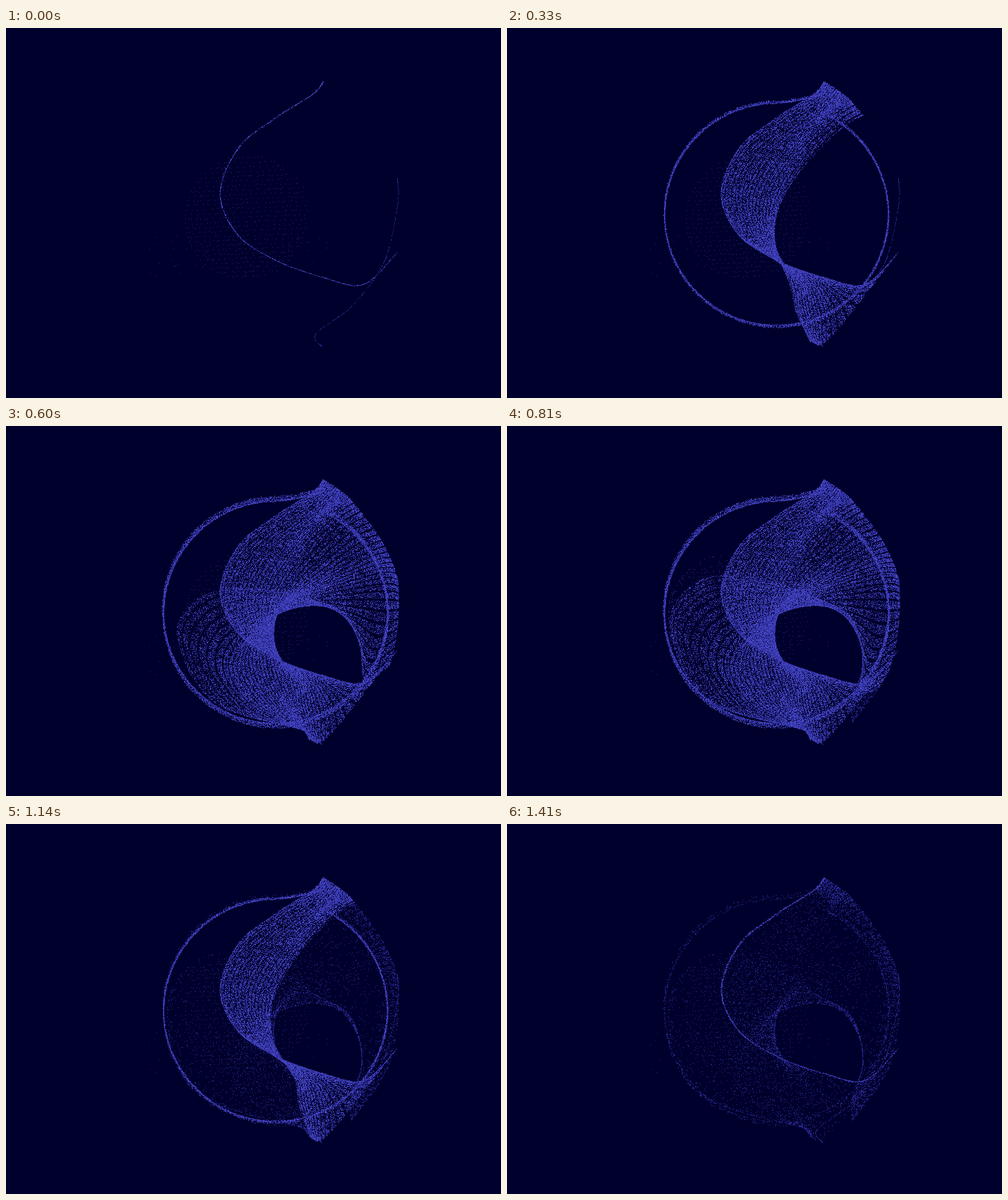
Animation, 719 px wide and 537 px high, one loop 1440 ms. Source, as an HTML page with a canvas:

```html
<!DOCTYPE html>
<html lang="en">
<head>
<meta charset="utf-8">
<title>Thread surface</title>
<style>
  html, body { margin: 0; width: 100%; height: 100%; overflow: hidden; background: #00002c; }
  canvas { display: block; }
</style>
</head>
<body>
<canvas id="stage" width="719" height="537"></canvas>
<script>
const W = 719, H = 537, LOOP = 1440, STEP = 30;
const ctx = document.getElementById('stage').getContext('2d');
const image = ctx.createImageData(W, H);
const pixels = new Uint32Array(image.data.buffer);

const rgb = (r, g, b) => (255 << 24 | b << 16 | g << 8 | r) >>> 0;
const BACK = rgb(0, 0, 44);
const DIM = rgb(36, 36, 132);
const TONES = [rgb(74, 74, 198), rgb(56, 56, 176), rgb(40, 40, 146)];

let seed = 7;
function random() {
  seed = seed + 0x6D2B79F5 | 0;
  let x = Math.imul(seed ^ seed >>> 15, 1 | seed);
  x = x + Math.imul(x ^ x >>> 7, 61 | x) ^ x;
  return ((x ^ x >>> 14) >>> 0) / 4294967296;
}

// Key threads of the surface, each running from the right rim to the bottom tip.
const THREADS = [
  [460,77, 445,95, 390,130, 336,174, 310,240, 335,299, 390,336, 462,362, 520,371, 568,325],
  [483,92, 466,112, 420,150, 370,195, 347,245, 361,299, 392,338, 437,362, 464,400, 470,448],
  [505,112, 478,130, 430,180, 398,228, 384,272, 387,312, 402,343, 420,372, 427,412, 442,455],
  [550,175, 527,183, 482,207, 436,234, 402,258, 382,290, 372,325, 378,366, 405,410, 442,450],
  [570,243, 550,240, 495,245, 440,252, 395,272, 352,302, 329,343, 340,380, 375,415, 440,445],
  [556,350, 520,370, 514,320, 492,272, 440,250, 360,233, 285,243, 246,300, 300,400, 435,440],
  [500,432, 500,395, 517,345, 500,285, 450,247, 385,205, 290,190, 234,260, 270,385, 430,435]
];
const TAIL = [568,218, 569,250, 557,315, 540,355, 500,405, 450,443, 458,462];

// Catmull-Rom through count values, at position x in 0..count-1.
function spline(value, count, x) {
  const i = Math.min(Math.floor(x), count - 2), f = x - i;
  const at = k => value(Math.max(0, Math.min(count - 1, k)));
  const a = at(i - 1), b = at(i), c = at(i + 1), d = at(i + 2);
  return b + f / 2 * (c - a + f * (2 * a - 5 * b + 4 * c - d + f * (3 * (b - c) + d - a)));
}
const alongPath = (path, x, axis) => spline(k => path[2 * k + axis], path.length / 2, x);
const onSurface = (s, x, axis) => spline(k => alongPath(THREADS[k], x, axis), THREADS.length, s);

const dots = [];
function addDot(x, y, birth, lingers, tone) {
  dots.push({ at: Math.round(y) * W + Math.round(x), birth, lingers, tone });
}
const anyTone = () => TONES[Math.floor(random() * 3)];

function addResidue() {
  for (let row = 0; row < 27; row++) {
    const dy = -86 + row * 6.6, half = Math.sqrt(Math.max(0, 90 * 90 - dy * dy));
    for (let dx = -half; dx < half; dx += 2 + random() * 8) {
      addDot(350 + dx, 273 + dy - dx * 0.04 + random() * 2, 0, true, DIM);
    }
  }
  for (let i = 0; i < 60; i++) {
    addDot(208 + random() * 260, 300 + random() * 60, 0, true, DIM);
  }
}

function addTail() {
  for (let i = 0; i < 300; i++) {
    const x = random() * 6;
    addDot(alongPath(TAIL, x, 0), alongPath(TAIL, x, 1), 0, true, TONES[2]);
  }
}

function addThreads() {
  const perUnit = 8, strands = 6 * perUnit;
  for (let i = 0; i < strands; i++) {
    for (let n = 0; n < 1700; n++) {
      const s = (i + random() * 0.76) / perUnit, x = random() * 9;
      const keep = x < 1 ? 0.25 : 0.07;
      addDot(onSurface(s, x, 0), onSurface(s, x, 1), s, random() < keep, anyTone());
    }
  }
}

function addRing() {
  for (let n = 0; n < 9000; n++) {
    const grow = random() ** 2, a = (random() * 2 - 1) * Math.PI;
    const spread = 1.5 + 6 * Math.abs(Math.sin(a + 0.1));
    const r = 162 + (grow - 0.25) * spread + random() * 1.5;
    const x = 391 + r * Math.cos(a);
    let y = 270 + r * Math.sin(a);
    const degrees = a * 180 / Math.PI;
    if (degrees > -92 && degrees < -65) y -= 29 * ((x - 385) / 75) ** 2;
    addDot(x, y, 0.3 + 4 * grow, random() < 0.1, anyTone());
  }
}

addResidue();
addTail();
addThreads();
addRing();

function draw(now) {
  const t = Math.floor(now % LOOP / STEP) * STEP;
  const falling = t > LOOP / 2;
  const phase = (falling ? LOOP - t : t) / (LOOP / 2);
  const reach = Math.max(0.07, Math.min(6, 6.3 * phase ** 1.3));
  pixels.fill(BACK);
  for (const dot of dots) {
    if (dot.birth <= reach) pixels[dot.at] = dot.tone;
    else if (falling && dot.lingers) pixels[dot.at] = TONES[2];
  }
  ctx.putImageData(image, 0, 0);
}

const start = performance.now();
function tick() {
  draw(performance.now() - start);
  requestAnimationFrame(tick);
}
tick();
</script>
</body>
</html>
```
